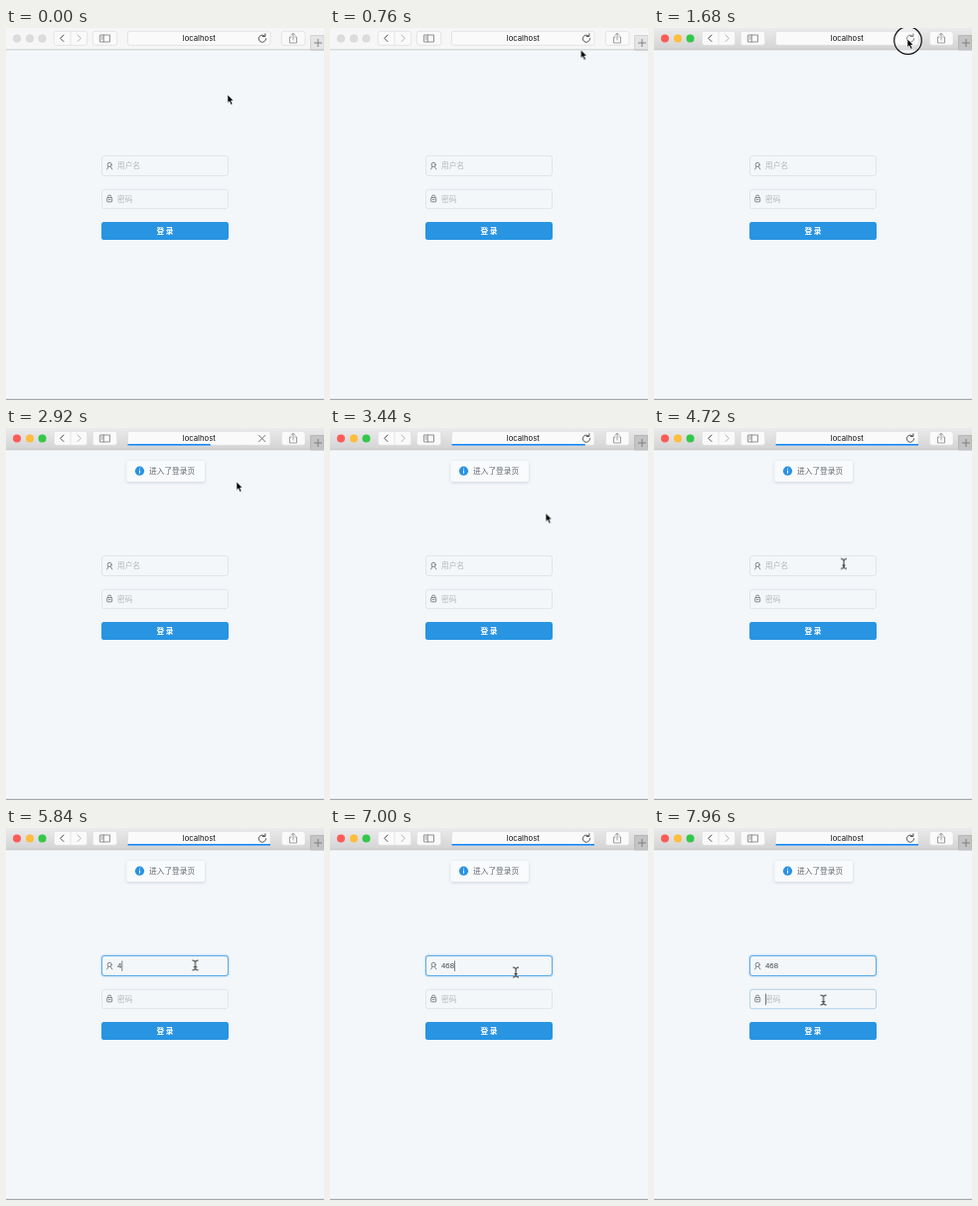
Animation of 320 by 374 pixels, one loop 8 s. Source, as an HTML page:

```html
<!DOCTYPE html>
<html lang="zh-CN">
<head>
<meta charset="utf-8">
<title>登录</title>
<style>
html, body { margin: 0; width: 100%; height: 100%; overflow: hidden; background: #f3f7fa; }
svg { display: block; width: 100vw; height: 100vh; }
text { font: 7.7px "Noto Sans CJK SC", "Noto Sans CJK", sans-serif; }
.hint { fill: #b3b7bc; }
.url { font: 7.7px Inter, Arial, sans-serif; fill: #111; text-anchor: middle; }
.typed { font: 7.8px "Liberation Sans", Arial, sans-serif; fill: #444; }
.line { fill: none; stroke-linecap: round; stroke-linejoin: round; }
.button { fill: #fafafa; stroke: #dcdcdc; stroke-width: .7; }
.field { fill: #f4f7f9; stroke: #e0e3e7; stroke-width: .9; }

/* Hard switches; 1% is 80 ms */
.step { animation: 8s step-end infinite; }
.inactive { animation-name: inactive; }
.reload { animation-name: reload; }
.stop { animation-name: stop; }
.ring-a { animation-name: ring-a; }
.ring-b { animation-name: ring-b; }
.ring-c { animation-name: ring-c; }
.arrow { animation-name: arrow; }
.beam { animation-name: beam; }
.focus { animation-name: focus; }
.hover { animation-name: hover; }
.empty { animation-name: empty; }
.key-a { animation-name: key-a; }
.key-b { animation-name: key-b; }
.key-c { animation-name: key-c; }
.name-caret { animation-name: name-caret; }
.pass-caret { animation-name: pass-caret; }
@keyframes inactive { 0% { visibility: visible } 21%, 100% { visibility: hidden } }
@keyframes reload { 0% { visibility: visible } 25% { visibility: hidden } 41%, 100% { visibility: visible } }
@keyframes stop { 0% { visibility: hidden } 25% { visibility: visible } 41%, 100% { visibility: hidden } }
@keyframes ring-a { 0% { visibility: hidden } 18.5% { visibility: visible } 22.5%, 100% { visibility: hidden } }
@keyframes ring-b { 0% { visibility: hidden } 62% { visibility: visible } 64.5%, 100% { visibility: hidden } }
@keyframes ring-c { 0% { visibility: hidden } 96.5% { visibility: visible } 99.5%, 100% { visibility: hidden } }
@keyframes arrow { 0% { visibility: visible } 53.5%, 100% { visibility: hidden } }
@keyframes beam { 0% { visibility: hidden } 53.5%, 100% { visibility: visible } }
@keyframes focus { 0% { visibility: hidden } 68%, 100% { visibility: visible } }
@keyframes hover { 0% { visibility: hidden } 91%, 100% { visibility: visible } }
@keyframes empty { 0% { visibility: visible } 73%, 100% { visibility: hidden } }
@keyframes key-a { 0% { visibility: hidden } 73%, 100% { visibility: visible } }
@keyframes key-b { 0% { visibility: hidden } 78%, 100% { visibility: visible } }
@keyframes key-c { 0% { visibility: hidden } 82.5%, 100% { visibility: visible } }
@keyframes name-caret {
  0% { visibility: hidden; transform: none }
  64.5% { visibility: visible; transform: none }
  73% { visibility: visible; transform: translateX(4.3px) }
  78% { visibility: visible; transform: translateX(8.7px) }
  82.5% { visibility: visible; transform: translateX(13px) }
  96.5%, 100% { visibility: hidden; transform: translateX(13px) }
}
@keyframes pass-caret { 0% { visibility: hidden } 99.5%, 100% { visibility: visible } }

.pointer { animation: pointer 8s linear infinite; }
@keyframes pointer {
  0%, .5% { transform: translate(223px, 67px); animation-timing-function: ease-in-out }
  10.5% { transform: translate(253px, 21px) }
  11% { transform: translate(253px, 20px); animation-timing-function: ease-out }
  15.5%, 32% { transform: translate(255px, 11px); animation-timing-function: ease-in }
  36.5% { transform: translate(232px, 54px) }
  42.5% { transform: translate(218px, 84px) }
  50% { transform: translate(206px, 108px) }
  53% { transform: translate(197px, 122px) }
  53.5% { transform: translate(196px, 129px); animation-timing-function: ease-out }
  59%, 72.5% { transform: translate(191px, 136.5px) }
  73.5%, 85% { transform: translate(190px, 139.5px); animation-timing-function: ease-in }
  87.5% { transform: translate(187px, 145px); animation-timing-function: ease-out }
  93.5%, 100% { transform: translate(170.5px, 173px) }
}
.progress { transform-origin: 122.6px 0; animation: progress 8s linear infinite; }
@keyframes progress {
  0%, 23% { transform: scaleX(0) }
  29%, 32% { transform: scaleX(.15) }
  36.5% { transform: scaleX(.58) }
  42.5% { transform: scaleX(.93) }
  48%, 100% { transform: scaleX(1) }
}
.notice { animation: notice 8s ease-out infinite; }
@keyframes notice {
  0%, 32.5% { opacity: 0; transform: translateY(-14px) }
  35.5%, 100% { opacity: 1; transform: none }
}
</style>
</head>
<body>
<svg viewBox="0 0 320 374">
  <defs>
    <linearGradient id="chrome" x2="0" y2="1">
      <stop stop-color="#ebebeb"/><stop offset="1" stop-color="#d3d3d3"/>
    </linearGradient>
    <filter id="shadow" x="-20%" y="-40%" width="140%" height="190%">
      <feDropShadow dx="0" dy="1" stdDeviation="1.6" flood-color="#304050" flood-opacity=".18"/>
    </filter>
  </defs>
  <rect width="320" height="374" fill="#f3f7fa"/>

  <!-- Toolbar -->
  <rect width="320" height="22" fill="url(#chrome)"/>
  <circle cx="11" cy="10.5" r="4" fill="#fc5b57"/>
  <circle cx="24" cy="10.5" r="4" fill="#fdbd3e"/>
  <circle cx="36.5" cy="10.5" r="4" fill="#35c749"/>
  <path d="M306.5 22V7.5H320V22Z" fill="#c4c4c4" stroke="#b0b0b0" stroke-width=".8"/>
  <g class="step inactive">
    <rect width="320" height="22" fill="#f6f6f6"/>
    <g fill="#dcdcdc" stroke="#d0d0d0" stroke-width=".5">
      <circle cx="11" cy="10.5" r="3.8"/><circle cx="24" cy="10.5" r="3.8"/><circle cx="36.5" cy="10.5" r="3.8"/>
    </g>
    <path d="M306.5 22V7.5H320V22Z" fill="#e5e5e5" stroke="#cfcfcf" stroke-width=".8"/>
  </g>
  <path d="M0 21.8H320" stroke="#c2c4c6" stroke-width=".8"/>
  <path d="M310 15H318M314 11V19" stroke="#777" stroke-width=".9"/>
  <g class="button">
    <rect x="48.3" y="3.3" width="33.4" height="14" rx="2.5"/>
    <rect x="87.3" y="3.3" width="24.4" height="14" rx="2.5"/>
    <rect x="122.4" y="3.3" width="143.7" height="14" rx="2.5"/>
    <rect x="277.3" y="3.3" width="23.8" height="14" rx="2.5"/>
    <path d="M65 3.3V17.3"/>
  </g>
  <g class="line" stroke="#555" stroke-width="1">
    <path d="M58 7L54.7 10.3 58 13.6"/>
    <path d="M72 7L75.3 10.3 72 13.6" stroke="#b4b4b4"/>
    <path d="M95 7H104.5V14H95ZM98.3 7V14M96.2 9H97.2M96.2 11H97.2" stroke="#777" stroke-width=".8"/>
    <path d="M287 9H285.5V15H292.5V9H291M289 12V5.5M287 7.3L289 5.3 291 7.3" stroke="#888" stroke-width=".8"/>
    <g class="step reload">
      <path d="M260.7 8.3A3.6 3.6 0 1 0 261.6 10.7M260.9 5.8V8.5H258.2"/>
    </g>
    <path class="step stop" d="M254.5 7.3L261 13.8M261 7.3L254.5 13.8" stroke="#777"/>
  </g>
  <text class="url" x="194.3" y="13.4">localhost</text>
  <rect class="progress" x="122.6" y="16" width="143.4" height="1.6" fill="#1688f5"/>

  <!-- Notice -->
  <g class="notice">
    <rect x="121.5" y="33" width="78.5" height="21" rx="2" fill="#f8fafc" filter="url(#shadow)"/>
    <circle cx="134.5" cy="43.2" r="4.6" fill="#2c93e0"/>
    <path d="M134.5 42.6V45.6M134.5 40.6V41.5" stroke="#fff" stroke-width="1"/>
    <text x="144" y="46.2" fill="#656a70">进入了登录页</text>
  </g>

  <!-- Form -->
  <rect class="field" x="96.5" y="128.5" width="127" height="20" rx="2.5"/>
  <g class="step focus" fill="none">
    <rect x="96" y="128" width="128" height="21" rx="3" stroke="#2d8cf0" stroke-opacity=".15" stroke-width="2.4"/>
    <rect x="96.5" y="128.5" width="127" height="20" rx="2.5" stroke="#5eade9" stroke-width="1"/>
  </g>
  <rect class="field" x="96.5" y="162.3" width="127" height="19.4" rx="2.5"/>
  <rect class="step hover" x="96.5" y="162.3" width="127" height="19.4" rx="2.5" fill="none" stroke="#b0d3eb" stroke-width=".9"/>
  <g class="line" stroke="#777b80" stroke-width=".9">
    <circle cx="104.2" cy="137.4" r="2.1"/>
    <path d="M103 139.4L101.6 142M105.4 139.4L106.8 142"/>
    <rect x="101.7" y="170.6" width="5" height="4.2" rx=".6"/>
    <path d="M102.6 170.4V169.6A1.6 1.6 0 0 1 105.8 169.6V170.4M103.4 172.6H105"/>
  </g>
  <text class="hint step empty" x="112" y="141.4">用户名</text>
  <text class="typed" x="112" y="141.3"><tspan class="step key-a">4</tspan><tspan class="step key-b">6</tspan><tspan class="step key-c">8</tspan></text>
  <text class="hint" x="112" y="174.6">密码</text>
  <path class="step name-caret" d="M112.4 133.5V144" stroke="#555" stroke-width=".8"/>
  <path class="step pass-caret" d="M112.4 166.5V178" stroke="#555" stroke-width=".8"/>
  <rect x="96" y="195" width="128" height="18" rx="2.5" fill="#2894e2"/>
  <text x="160" y="207" fill="#fff" text-anchor="middle" style="font-weight:700">登 录</text>

  <path d="M0 373.4H320" stroke="#9b9ea1" stroke-width="1"/>

  <!-- Pointer and click rings -->
  <g fill="#fff" fill-opacity=".25" stroke="#111" stroke-width="1.2">
    <circle class="step ring-a" cx="255.5" cy="12.5" r="13.8"/>
    <circle class="step ring-b" cx="190.7" cy="136.7" r="11"/>
    <circle class="step ring-c" cx="170.5" cy="173" r="11"/>
  </g>
  <g class="pointer">
    <path class="step arrow" d="M0 0V8.4L1.9 6.7 3.4 10.2 5 9.5 3.5 6.1H6Z" fill="#000" stroke="#fff" stroke-width=".6"/>
    <g class="step beam line">
      <path d="M-2.7-5Q0-5 0-3.4Q0-5 2.7-5M0-3.4V3.6M-2.7 5Q0 5 0 3.4Q0 5 2.7 5M-1.2 1.7H1.2" stroke="#fff" stroke-width="2"/>
      <path d="M-2.7-5Q0-5 0-3.4Q0-5 2.7-5M0-3.4V3.6M-2.7 5Q0 5 0 3.4Q0 5 2.7 5M-1.2 1.7H1.2" stroke="#222" stroke-width="1"/>
    </g>
  </g>
</svg>
</body>
</html>
```
